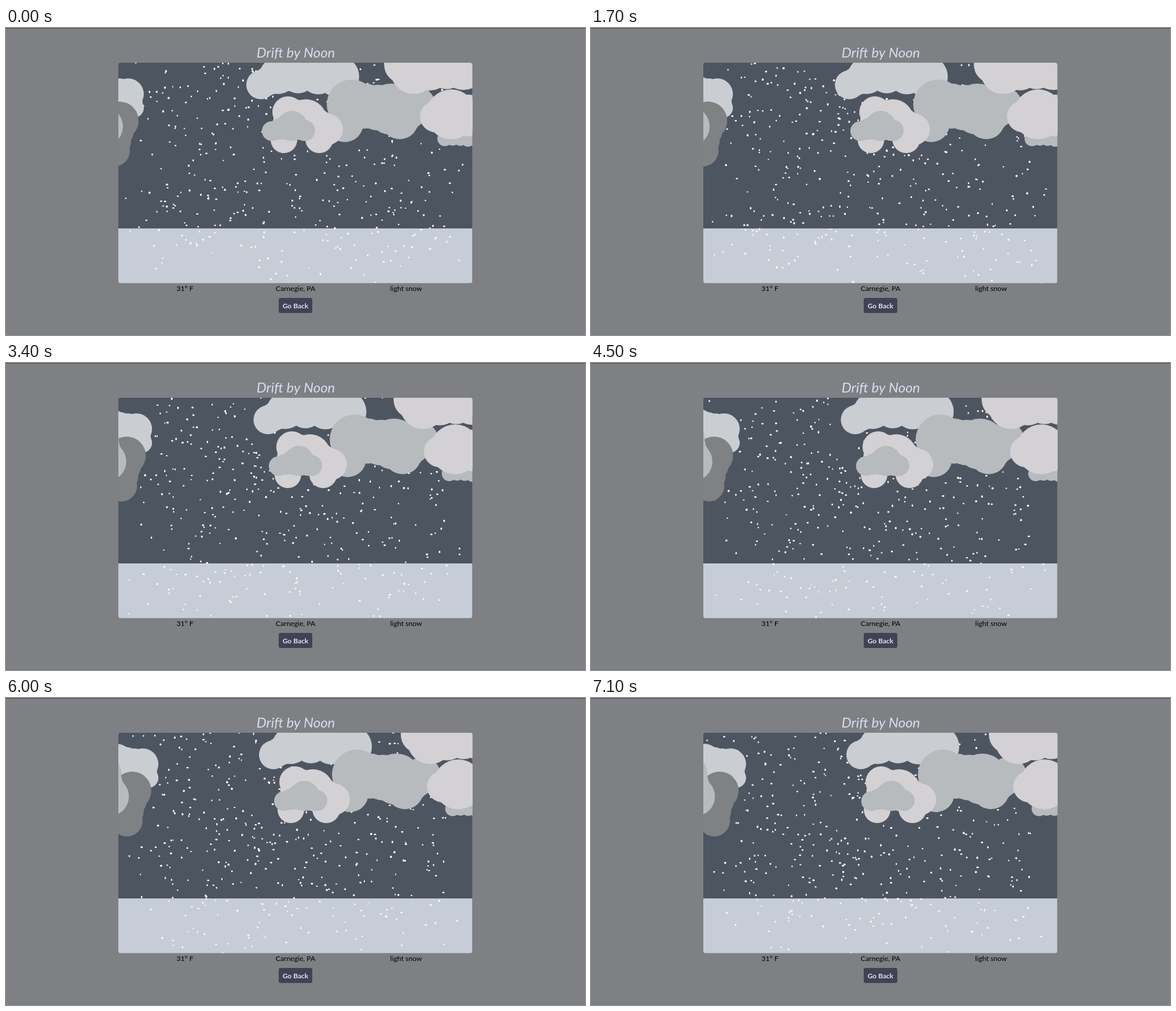
Animation, 1000 px wide and 530 px high, one loop 7200 ms. Source, as an HTML page with a canvas:

```html
<!DOCTYPE html>
<html lang="en">
<head>
<meta charset="utf-8">
<title>Snow scene</title>
<style>
  html, body { margin: 0; width: 100%; height: 100%; overflow: hidden; }
  canvas { display: block; }
</style>
</head>
<body>
<canvas id="stage" width="1000" height="530"></canvas>
<script>
const ctx = document.getElementById('stage').getContext('2d');
const LOOP = 7200, STEP = 100;
const LEFT = 194, TOP = 60, WIDTH = 611.5, HEIGHT = 380.5, HORIZON = 346;
const PALE = '#cacdd2', PINK = '#d3d1d4', GRAY = '#b8bbbe', DARK = '#808183';

let seed = 20;
function random(min, max) {
  seed = (seed * 1664525 + 1013904223) % 4294967296;
  return min + (max - min) * seed / 4294967296;
}

const flakes = Array.from({ length: 680 }, () => ({
  x: 500 + random(-1, 1) * random(230, 306),
  y: random(-125, 440),
  drift: random(-3, 2),
  fall: random(23.5, 25),
  size: random(1.4, 2.2),
  phase: random(0, 6.28),
  spin: random(1, 3),
  land: HORIZON + random(0, 140)
}));

function puff(x, y, r) {
  ctx.beginPath();
  ctx.arc(x, y, r, 0, 2 * Math.PI);
  ctx.fill();
}

// A cloud is a chain of main puffs [x, y, r], joined by slightly smaller ones.
function cloud(color, shift, ...puffs) {
  ctx.fillStyle = color;
  puffs.forEach(([x, y, r], i) => {
    puff(x + shift, y, r);
    if (!i) return;
    const [px, py, pr] = puffs[i - 1];
    for (const u of [1 / 3, 2 / 3]) {
      const mix = (a, b) => a + (b - a) * u;
      puff(mix(px, x) + shift, mix(py, y), mix(pr, r) * 0.9);
    }
  });
}

function drawClouds(t) {
  cloud(PALE, 4.2 * t, [166, 107, 28], [211, 114, 27], [221, 138, 17]);
  cloud(DARK, 3.66 * t, [196, 160, 33], [187, 212, 27]);
  cloud(GRAY, 1.7 * t, [159, 130, 30], [168, 170, 34]);
  cloud(PALE, 3.66 * t, [440, 98, 25], [470, 82, 32], [574, 84, 36]);
  cloud(GRAY, 1.5 * t, [585, 165, 32], [597, 132, 43], [665, 140, 44], [680, 160, 32], [710, 134, 32]);
  cloud(PINK, 2 * t, [480, 193, 23], [487, 145, 27], [518, 159, 36], [555, 175, 27], [541, 192, 24]);
  cloud(GRAY, 3.5 * t, [459, 178, 17], [494, 169, 26], [516, 177, 18]);
  cloud(GRAY, 2.25 * t, [758, 191, 13], [798, 193, 12]);
  cloud(PINK, 2 * t, [742, 153, 27], [769, 149, 43], [798, 151, 36]);
  cloud(PINK, 4.8 * t, [686, 63, 33], [704, 74, 40], [790, 68, 39]);
}

function drawSnow(t) {
  ctx.fillStyle = '#fffaf2';
  for (const f of flakes) {
    const y = f.y + f.fall * t, turn = f.phase + f.spin * t;
    if (y > f.land) continue;
    const squash = v => f.size * (0.6 + 0.4 * Math.abs(v));
    ctx.beginPath();
    ctx.ellipse(f.x + f.drift * t, y, squash(Math.cos(turn)), squash(Math.sin(turn)), 0, 0, 2 * Math.PI);
    ctx.fill();
  }
}

function text(str, x, y, font, color) {
  ctx.font = font + ' Lato, "Open Sans", sans-serif';
  ctx.fillStyle = color;
  ctx.fillText(str, x, y);
}

function rect(color, x, y, w, h) {
  ctx.fillStyle = color;
  ctx.fillRect(x, y, w, h);
}

function box(x, y, w, h, r) {
  ctx.beginPath();
  ctx.roundRect(x, y, w, h, r);
}

function draw(t) {
  rect('#7f8084', 0, 0, 1000, 530);
  rect('#4a4a52', 0, 0, 1000, 1);

  ctx.save();
  box(LEFT, TOP, WIDTH, HEIGHT, 4);
  ctx.clip();
  rect('#4d5561', LEFT, TOP, WIDTH, HEIGHT);
  rect('#c6cdd7', LEFT, HORIZON, WIDTH, HEIGHT);
  drawSnow(t);
  drawClouds(t);
  ctx.restore();

  ctx.textAlign = 'center';
  text('Drift by Noon', 500.5, 51, 'italic 24px', '#d5def0');
  ['31° F', 'Carnegie, PA', 'light snow'].forEach((label, i) =>
    text(label, 309 + 191 * i, 454, '12.2px', '#000'));
  ctx.fillStyle = '#434154';
  box(471, 466, 58, 26, 3);
  ctx.fill();
  text('Go Back', 500, 484, 'bold 12px', '#dde4f2');
}

const start = performance.now();
function frame() {
  const ms = (performance.now() - start) % LOOP;
  draw(Math.floor(ms / STEP) * STEP / 1000);
  requestAnimationFrame(frame);
}
frame();
</script>
</body>
</html>
```
